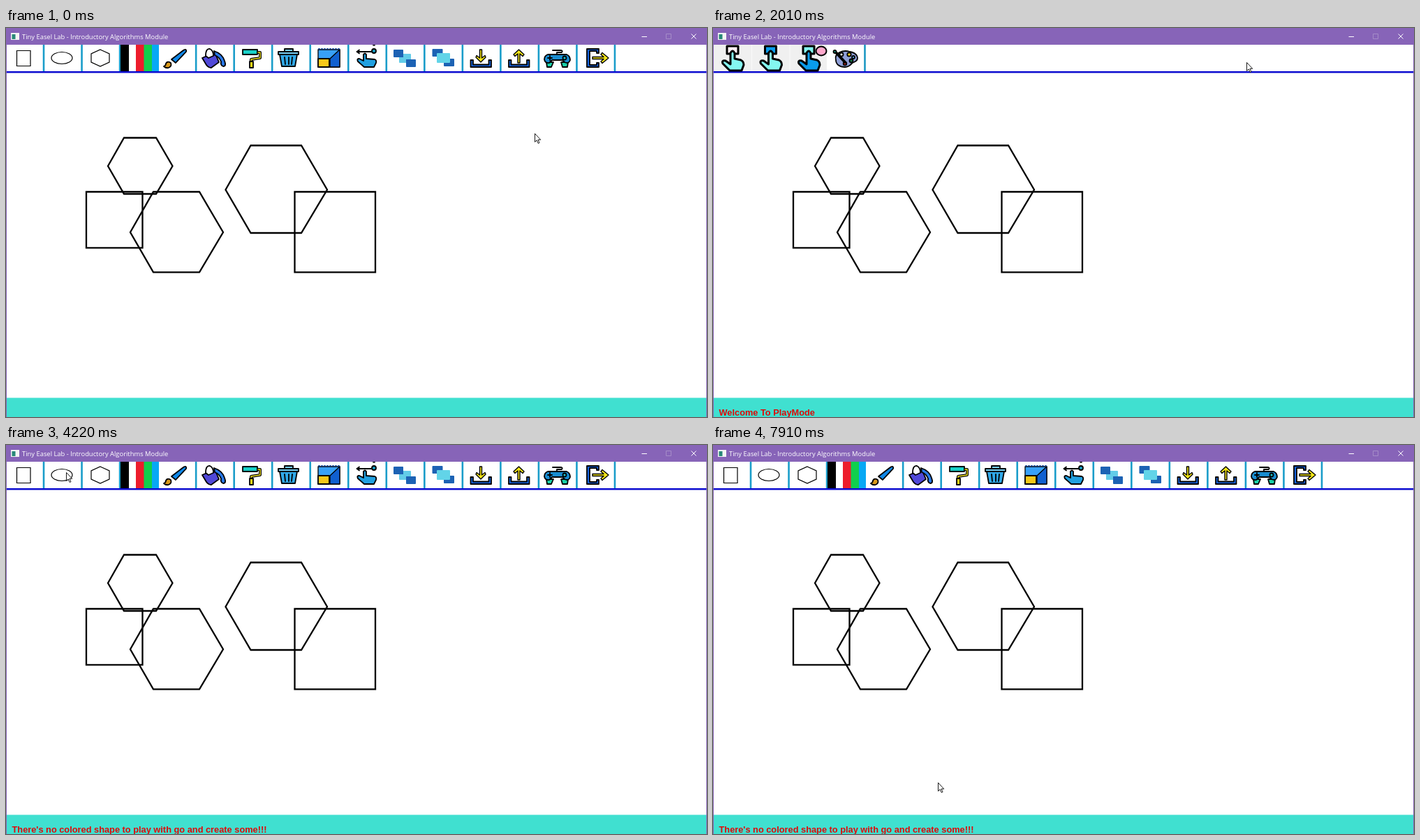
These frames come from a looping animation (1004x558 px, 8000 ms). An HTML page:

```html
<!DOCTYPE html>
<html lang="en">
<head>
<meta charset="utf-8">
<title>Drawing window</title>
<style>
html, body { margin: 0; height: 100%; overflow: hidden; background: #fff; }
svg { display: block; width: 1004px; height: 558px; }
.title { font: 9.4px "Open Sans", sans-serif; fill: #fff; }
.status { font: bold 12.8px "Liberation Sans", Arial, sans-serif; fill: #e00808; }
.thin { fill: none; stroke: #000; stroke-width: 1.2; }
.icon { stroke: #000; stroke-width: 1.8; stroke-linejoin: round; stroke-linecap: round; }
.bold { stroke: #000; stroke-width: 3; stroke-linejoin: round; }
</style>
</head>
<body>
<svg viewBox="0 0 1004 558">
  <defs>
    <g id="shapeIcons" class="thin">
      <path d="M15.5 32.5H35V54.5H15.5Z"/>
      <ellipse cx="80" cy="43" rx="15" ry="8.5"/>
      <path d="M135 31L148 37V49L135 55L122 49V37Z"/>
    </g>
    <path id="hand" d="M25 36Q28 30 31 36V44L40 46Q44 48 44 53L41 61H24L14 51Q12 46 18 47L25 52Z"/>
    <path id="plate" d="M20 26H36V37H20Z"/>
    <g id="palette" class="icon">
      <path fill="#8f9fd8" d="M176 46C173 36 186 31 196 34C207 36 211 45 202 49C196 51 199 55 189 56C181 56 176 52 176 46Z"/>
      <circle cx="184" cy="38" r="2.5" fill="#fff"/>
      <circle cx="195" cy="38" r="2.7" fill="#f5d020"/>
      <circle cx="201" cy="42" r="2" fill="#58b8f0"/>
      <circle cx="198" cy="47" r="2.5" fill="#187848"/>
      <circle cx="189" cy="51" r="2.3" fill="#e03030"/>
      <path stroke-width="4" d="M176 35L189 49"/>
      <circle cx="174.500" cy="34" r="2" fill="#18a088"/>
    </g>
    <path id="tray" fill="#1464e0" d="M665.500 46H669V52.500H691.500V46H695V56H665.500Z"/>
  </defs>

  <rect width="1004" height="558" fill="#fff"/>

  <g id="drawBar">
    <path d="M0 63.300H1004" stroke="#0c0cd0" stroke-width="2.600"/>
    <g class="separators"></g>
    <use href="#shapeIcons"/>
    <path fill="#000" d="M164 24H176V62H164Z"/>
    <path fill="#ed1c2c" d="M186 24H198V62H186Z"/>
    <path fill="#10d04c" d="M197.500 24H209V62H197.500Z"/>
    <path fill="#08a8f4" d="M209 24H219V62H209Z"/>
    <g class="icon">
      <!-- brush -->
      <path fill="#1088e8" d="M237 45L254 32Q259 29 258 34L243 50Z"/>
      <path fill="#d89818" d="M226 55Q229 54 229 51Q231 47 236 50Q238 55 233 57Q229 58 226 55Z"/>
      <!-- bucket -->
      <path fill="#5048d8" d="M281 43L299 35L305 49L294 57Q290 57 287 53Z"/>
      <path fill="#fff" d="M286 40Q286 29 292 30Q297 32 297 40L290 43Z"/>
      <path fill="#2878e8" d="M298 33Q310 37 313 47Q316 55 311 55Q307 54 308 48Q305 41 299 39Z"/>
      <!-- roller -->
      <path fill="#18d0c8" d="M339 31H360V38H339Z"/>
      <path fill="none" stroke-width="4" d="M361 35H364V43L351 45V48"/>
      <path fill="none" stroke="#f0e020" stroke-width="1.500" d="M361 35H364V43L351 45V48"/>
      <path fill="#f0d818" d="M349 48H354V57H349Z"/>
      <!-- bin -->
      <path fill="#30a8e8" d="M392 38H417L414 55H395Z"/>
      <path fill="#78d0f4" d="M390 34H419V38H390ZM399 34V30H411V34"/>
      <path fill="none" d="M399 42L400 52M405 42V52M410 42L409 52"/>
      <!-- resize -->
      <path fill="#38a0f8" stroke-width="1.300" d="M447 31H478V56H447Z"/>
      <path fill="#1060d0" stroke-width="1.300" d="M464 44L478 31V56H464Z"/>
      <path fill="#f8c818" d="M447 44H463V56H447Z"/>
      <path stroke="#104090" stroke-dasharray="1 3" d="M448 30H478"/>
      <!-- drag hand -->
      <path fill="#20a0e0" d="M512 38Q514 35 516 38V44L528 45Q531 46 530 50L527 56H513L504 48Q502 44 506 44L512 47Z"/>
      <path fill="none" d="M503 34H524M506 31.500L502.500 34L506 36.500"/>
      <circle cx="527" cy="33" r="3" fill="#18a0c8"/>
      <path d="M526 24.500H528"/>
    </g>
    <!-- layer order -->
    <g fill="#1c62b4">
      <rect x="555" y="31" width="14" height="11" rx="1"/>
      <rect x="573" y="45" width="14" height="11" rx="1"/>
      <rect x="563" y="37" width="17" height="13" rx="1" fill="#62cce8"/>
      <path d="M563 37H569V42H563ZM573 45H580V50H573Z"/>
      <rect x="610.500" y="30" width="15" height="11" rx="1"/>
      <rect x="627" y="44" width="15" height="11" rx="1"/>
      <rect x="617" y="36" width="19" height="14" rx="1" fill="#62d4e8"/>
    </g>
    <g class="icon">
      <use href="#tray"/>
      <path fill="#f8e818" stroke-width="1.400" d="M678.500 31H681.500V43L686 39.500L687 42L680 49L673 42L674 39.500L678.500 43Z"/>
      <use href="#tray" x="54.500"/>
      <path fill="#f8e818" stroke-width="1.400" d="M733 50H736V37L740 40.500L742 38L734.500 31L727 38L729 40.500L733 37Z"/>
      <!-- gamepad -->
      <path fill="none" d="M789 38V35H796Q798 32 794 32H783"/>
      <path fill="#18d0a8" d="M774 49H784L781 56H775ZM795 49H805L804 56H797Z"/>
      <path fill="#188cd0" d="M776 38H803Q808 40 808 46Q806 52 800 49L797 46H782L778 50Q772 51 771 45Q771 40 776 38Z"/>
      <path fill="none" d="M779 40V46M776 43H782"/>
      <circle cx="800" cy="43" r="2.500" fill="#20c8d0"/>
      <!-- exit -->
      <path fill="#1464e0" d="M832 30H849V36H846V33H836V53H846V50H849V56H832Z"/>
      <path fill="#f8e818" stroke-width="1.400" d="M840 41.500H856L852 38L854 35.500L863 43L854 50.500L852 48L856 44.500H840Z"/>
    </g>
  </g>

  <g id="playBar">
    <path fill="#f0f0f0" d="M1 24H163V62H1Z"/>
    <path stroke="#fafafa" d="M55.500 24V62M110 24V62"/>
    <path d="M0 63.300H1004" stroke="#0c0cd0" stroke-width="2.600"/>
    <path d="M217.500 24V62" stroke="#1494c0" stroke-width="2.500"/>
    <g class="bold">
      <use href="#plate" fill="#fff0f4"/><use href="#hand" fill="#84f6f0"/>
      <g transform="translate(54.500)"><use href="#plate" fill="#0a9cec"/><use href="#hand" fill="#84f6f0"/></g>
      <g transform="translate(109)"><use href="#plate" fill="#84f6f0"/><use href="#hand" fill="#0a9cec"/></g>
      <ellipse cx="155" cy="33" rx="7.500" ry="6.500" fill="#ffa8cc" stroke-width="2"/>
    </g>
    <use href="#palette"/>
  </g>

  <g id="shapeBar">
    <path d="M163 62.500H1004" stroke="#2020a8" stroke-width="1.300"/>
    <path d="M54 24V63M108.500 24V63M163 24V63M217.500 24V63" stroke="#1494c0" stroke-width="2.500"/>
    <use href="#shapeIcons"/><use href="#palette"/>
  </g>

  <g fill="none" stroke="#000" stroke-width="2.300">
    <path d="M146 198L169 157.500H215L238.500 198L215 238H169Z"/>
    <path d="M115 235H195.500V315.300H115Z"/>
    <path d="M178 293L211 235H277L311 293L277 350.300H211Z"/>
    <path d="M314.500 232L350.500 168.500H423L460 232L423 294H350.500Z"/>
    <path d="M413.500 235H529V350.300H413.500Z"/>
  </g>

  <rect y="530.500" width="1004" height="28" fill="#40e0d0"/>
  <text class="status" id="status" x="8.500" y="555.500"></text>

  <path fill="#8764b8" d="M0 0H1004V558H1003V24H1V558H0Z"/>
  <rect x="7" y="7" width="12" height="10" fill="#f4f4f4"/>
  <rect x="8.500" y="9" width="5" height="7" fill="#288878"/>
  <text class="title" x="23" y="16">Tiny Easel Lab - Introductory Algorithms Module</text>
  <g fill="none" stroke="#fff">
    <path d="M910.500 12.500H918"/>
    <path d="M945.500 8.500H952.500V15.500H945.500Z" stroke="#a58cc8"/>
    <path d="M981.500 8.500L988.500 15.500M988.500 8.500L981.500 15.500"/>
  </g>

  <path id="cursor" d="M.5 .5V12.500L3.200 10L5.200 14.500L7 13.700L5 9.300H8.700Z" fill="#fff" stroke="#000" stroke-width=".9"/>
</svg>
<script>
const LOOP = 8000;
const $ = id => document.getElementById(id);

let lines = "";
for (let i = 1; i <= 16; i++) if (i !== 4) lines += `M${i * 54.53 - 0.5} 24V62`;
document.querySelector(".separators").innerHTML =
  `<path d="${lines}" stroke="#1a9dca" stroke-width="2.600"/>`;

// Cursor moves: first jump, last jump, number of jumps, end point
const start = [757, 151];
const moves = [
  [80, 790, 10, 777, 45],
  [2010, 2010, 1, 764, 49],
  [2110, 2210, 2, 340, 270],
  [2510, 2600, 2, 136, 41],
  [2910, 3230, 5, 86, 39],
  [4420, 4420, 1, 113, 211],
  [4490, 4490, 1, 134, 259],
  [4740, 4890, 3, 180, 466],
  [5150, 5300, 3, 213, 553],
  [5630, 5630, 1, 225, 550],
  [5710, 6350, 9, 322, 553],
  [6530, 6530, 1, 297, 549],
  [7270, 7270, 1, 211, 543],
  [7460, 7460, 1, 61, 545],
  [7910, 7910, 1, 322, 484]
];

// Start time, visible toolbar, status message
const welcome = "Welcome To PlayMode";
const back = "Back To DrawMode";
const scenes = [
  [0, "drawBar", ""],
  [1200, "playBar", welcome],
  [3640, "shapeBar", welcome],
  [3720, "shapeBar", back],
  [3880, "drawBar", back],
  [4040, "drawBar", "There's no colored shape to play with go and create some!!!"]
];

function cursorAt(t) {
  let [x, y] = start;
  for (const [from, to, jumps, endX, endY] of moves) {
    if (t < from) break;
    const gap = (to - from) / (jumps - 1) || 1;
    const done = Math.min(jumps, Math.floor((t - from) / gap + 1e-6) + 1) / jumps;
    x += (endX - x) * done;
    y += (endY - y) * done;
  }
  return [x, y];
}

function render(t) {
  const [, bar, message] = scenes.filter(s => s[0] <= t).pop();
  for (const id of ["drawBar", "playBar", "shapeBar"])
    $(id).style.display = id === bar ? "" : "none";
  $("status").textContent = message;
  $("cursor").setAttribute("transform", `translate(${cursorAt(t).map(Math.round)})`);
}

const began = performance.now();
function tick() {
  render((performance.now() - began) % LOOP);
  requestAnimationFrame(tick);
}
tick();
</script>
</body>
</html>
```
